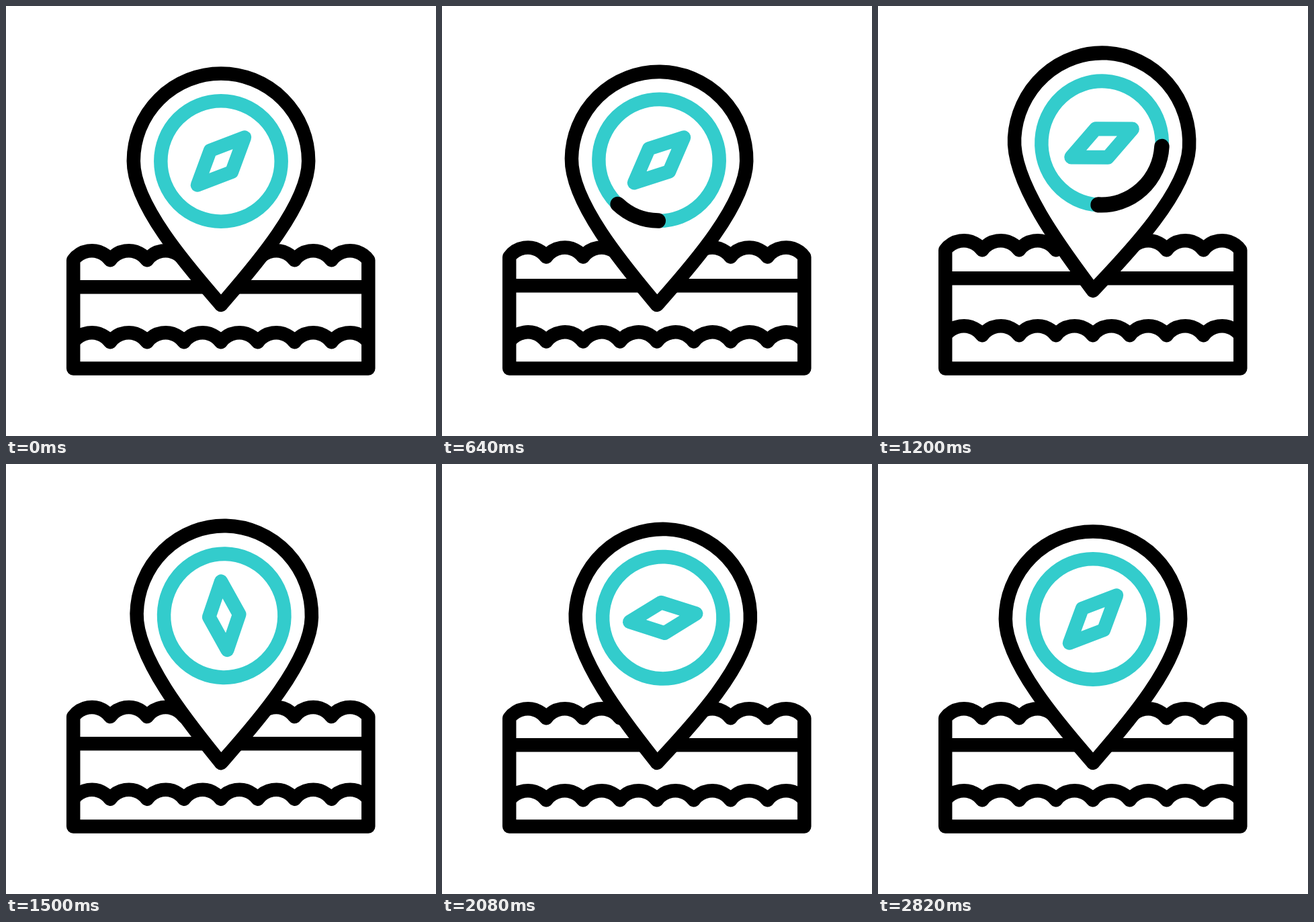
Recreate the animation shown at these times as an HTML page with a canvas. Size 640 px wide and 640 px high, loop 3080 ms.

```html
<!DOCTYPE html>
<html lang="en">
<head>
<meta charset="utf-8">
<title>Map pin over water</title>
<style>
  html, body { margin: 0; width: 100%; height: 100%; overflow: hidden; background: #fff; }
  canvas { display: block; width: 100vw; height: 100vh; }
</style>
</head>
<body>
<canvas id="stage" width="640" height="640"></canvas>
<script>
const ctx = document.getElementById('stage').getContext('2d');
const LOOP = 3080, STEP = 20, RAD = Math.PI / 180;
const TEAL = '#33cccc', INK = '#000', LINE = 20.5;
const LEFT = 100.2, RIGHT = 539.3, BOTTOM = 539.5, BUMPS = 8;
const TIP = { x: 320, y: 445 }, HUB = -214;

// Keyframes: [time, value]
const tilt = [[0, 0], [440, 8.6], [870, -8.9], [1300, 5.2], [1740, -4.05], [2180, 3.2], [2640, 0]];
const stretch = [[0, 1], [440, 0.97], [870, 1.055], [1300, 1.024], [1740, 1.026], [2360, 1]];
const hop = [[640, 0], [1032, -35], [1424, 0]];
const wipeEnd = [[506, 0], [1106, 360]];
const wipeStart = [[800, 0], [1400, 360]];
const spin = [[0, 0], [440, -123.5], [860, -238], [1200, -342], [1820, -471.5], [2360, -526], [2820, -540]];
const swell = (up, down, again) => [[0, 0], [400, up], [800, down], [1200, again], [1600, 0]];
const surface = swell(-27, 7, -15), level = swell(-18.6, 7, -13), ripple = swell(-15.6, 7, -10);

const smooth = f => (1 - Math.cos(Math.PI * f)) / 2;

function segment(keys, t) {
  let i = 0;
  while (i < keys.length - 2 && t >= keys[i + 1][0]) i++;
  const [t0] = keys[i], [t1] = keys[i + 1];
  return [i, Math.min(1, Math.max(0, (t - t0) / (t1 - t0)))];
}

function eased(keys, t) {
  const [i, f] = segment(keys, t);
  return keys[i][1] + (keys[i + 1][1] - keys[i][1]) * smooth(f);
}

// Cubic curve through all keys, coming to rest at the last one
function flowing(keys, t) {
  const [i, f] = segment(keys, t);
  const slope = k => {
    if (k === keys.length - 1) return 0;
    const a = keys[Math.max(0, k - 1)], b = keys[k + 1];
    return (b[1] - a[1]) / (b[0] - a[0]);
  };
  const [t0, a] = keys[i], [t1, b] = keys[i + 1], d = t1 - t0;
  const g = 1 - f;
  return a * g * g * (1 + 2 * f) + b * f * f * (3 - 2 * f)
    + d * f * g * (slope(i) * g - slope(i + 1) * f);
}

function stroke(color, width = LINE) {
  ctx.strokeStyle = color;
  ctx.lineWidth = width;
  ctx.stroke();
}

function wave(y) {
  const half = (RIGHT - LEFT) / BUMPS / 2, rise = 14;
  const r = (half * half + rise * rise) / (2 * rise);
  const a = Math.asin(half / r), up = -Math.PI / 2;
  for (let i = 0; i < BUMPS; i++) {
    ctx.arc(LEFT + half * (2 * i + 1), y - rise + r, r, up - a, up + a);
  }
}

function drawWater(t) {
  const top = 378.2 + eased(surface, t), mid = 418.2 + eased(level, t);
  ctx.lineCap = 'butt';
  ctx.beginPath();
  wave(top);
  ctx.lineTo(RIGHT, BOTTOM);
  ctx.lineTo(LEFT, BOTTOM);
  ctx.closePath();
  stroke(INK);
  ctx.beginPath();
  ctx.moveTo(LEFT, mid);
  ctx.lineTo(RIGHT, mid);
  stroke(INK);
  ctx.beginPath();
  wave(500.2 + eased(ripple, t));
  stroke(INK);
}

function drawNeedle(t) {
  ctx.save();
  ctx.rotate(flowing(spin, t) * RAD);
  ctx.beginPath();
  ctx.moveTo(35, -35.5);
  ctx.lineTo(16, 16);
  ctx.lineTo(-35, 35.5);
  ctx.lineTo(-16, -16);
  ctx.closePath();
  stroke(TEAL);
  ctx.restore();
}

function drawDial(t) {
  ctx.beginPath();
  ctx.arc(0, 0, 89.7, 0, 2 * Math.PI);
  stroke(TEAL);
  const from = eased(wipeStart, t), to = eased(wipeEnd, t);
  if (to > from) {
    ctx.beginPath();
    ctx.arc(0, 0, 89.5, (90 + from) * RAD, (90 + to) * RAD);
    stroke(INK, 22.5);
  }
  drawNeedle(t);
}

function drawPin(t) {
  ctx.save();
  ctx.translate(TIP.x, TIP.y + eased(hop, t));
  ctx.rotate(eased(tilt, t) * RAD);
  ctx.scale(1, eased(stretch, t));
  ctx.lineCap = 'round';
  ctx.beginPath();
  ctx.arc(0, HUB - 0.3, 130.2, Math.PI, 0);
  ctx.bezierCurveTo(130.2, -148, 45, -52, 0, 0);
  ctx.bezierCurveTo(-45, -52, -130.2, -148, -130.2, HUB - 0.3);
  ctx.closePath();
  ctx.fillStyle = '#fff';
  ctx.fill();
  stroke(INK);
  ctx.translate(0, HUB);
  drawDial(t);
  ctx.restore();
}

function draw(t) {
  ctx.fillStyle = '#fff';
  ctx.fillRect(0, 0, 640, 640);
  ctx.lineJoin = 'round';
  drawWater(t);
  drawPin(t);
}

const begin = performance.now();
function tick() {
  const t = (performance.now() - begin) % LOOP;
  draw(Math.floor(t / STEP) * STEP);
  requestAnimationFrame(tick);
}
tick();
</script>
</body>
</html>
```
